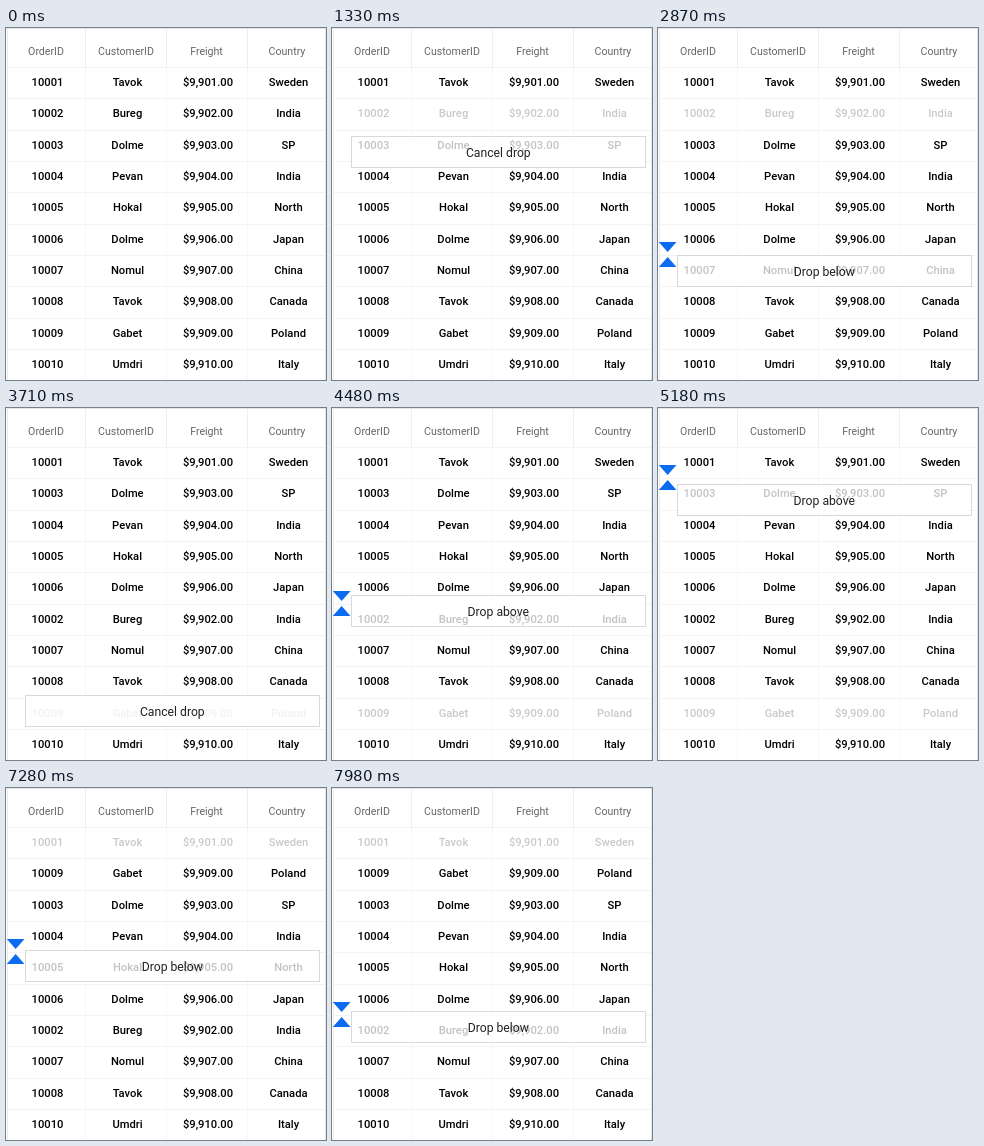
Animation, 320 px wide and 352 px high, one loop 8 s. Source, as an HTML page:

```html
<!DOCTYPE html>
<html lang="en">
<head>
<meta charset="utf-8">
<title>Row drag and drop</title>
<style>
html, body { margin: 0; width: 100%; height: 100%; overflow: hidden; background: #fff; }
svg { display: block; width: 320px; height: 352px; }
text { font-family: Roboto, "Open Sans", sans-serif; text-anchor: middle; }
.head { font-size: 10.6px; fill: #666; }
.cell { font-size: 11.2px; font-weight: 500; fill: #000; }
.tip { font-size: 12.2px; fill: #222; }
</style>
</head>
<body>
<svg id="stage" viewBox="0 0 320 352"></svg>
<script>
const LOOP = 8000, STEP = 70, TOP = 39, PITCH = 31.35;
const COLS = [41.5, 121.5, 202, 282.5];
const HEADS = ["OrderID", "CustomerID", "Freight", "Country"];
const CUSTOMERS = ["Tavok", "Bureg", "Dolme", "Pevan", "Hokal", "Dolme", "Nomul", "Tavok", "Gabet", "Umdri"];
const COUNTRIES = ["Sweden", "India", "SP", "India", "North", "Japan", "China", "Canada", "Poland", "Italy"];

// slot: row picked up; to: slot it lands in; path: [ms, top of the dragged box]
const DRAGS = [
  { slot: 1, to: 5, dim: 700, drop: 3220, grip: -7, label: "Drop below",
    path: [[700, 71], [1330, 108], [1470, 121], [2170, 185], [2310, 195], [3080, 232]] },
  { slot: 8, to: 1, dim: 3430, drop: 6090, grip: 16, label: "Drop above",
    path: [[3570, 287], [3710, 287], [4340, 209], [5180, 76], [6020, 56]] },
  { slot: 0, to: 5, dim: 6300, drop: LOOP, grip: -7, label: "Drop below",
    path: [[6510, 40], [6650, 64], [7280, 162], [7980, 223]] }
];

const stage = document.getElementById("stage");

function add(parent, tag, attrs, text) {
  const el = document.createElementNS("http://www.w3.org/2000/svg", tag);
  for (const k in attrs) el.setAttribute(k, attrs[k]);
  if (text) el.textContent = text;
  return parent.appendChild(el);
}
const line = (x, y, width, height, fill) => add(stage, "rect", { x, y, width, height, fill });
const edge = i => TOP + i * PITCH;

for (const x of [79, 160, 241]) {
  line(x, 1, 1, 38, "#eeeeee");
  line(x, 40, 1, 312, "#f7f7f7");
}
for (let i = 0; i < 10; i++) line(2, Math.round(edge(i)), 317, 1, "#f3f3f3");
line(0, 0, 320, 1, "#e6e6e6");
line(1, 0, 1, 352, "#ececec");
line(319, 0, 1, 352, "#e6e6e6");
HEADS.forEach((h, c) => add(stage, "text", { class: "head", x: COLS[c] - 1.5, y: 27 }, h));

const rows = CUSTOMERS.map((name, i) => {
  const g = add(stage, "g", {});
  const cells = [String(10001 + i), name, "$9,9" + String(i + 1).padStart(2, "0") + ".00", COUNTRIES[i]];
  cells.forEach((s, c) => add(g, "text", { class: "cell", x: COLS[c], y: 19 }, s));
  return g;
});

const box = add(stage, "g", {});
add(box, "rect", { x: 19.5, y: .5, width: 294, height: 31, fill: "#fff", "fill-opacity": .76, stroke: "#d9d9d9" });
const tip = add(box, "text", { class: "tip", x: 166.3, y: 20.5 }, "Cancel drop");
const arrows = add(stage, "path", { d: "M.8 -13H18.5L9.65 -3ZM.8 12H18.5L9.65 2Z", fill: "#0b6cf0" });

// Smooth curve through the path's points, at rest at its end.
function along(path, t) {
  const n = path.length - 1;
  if (t >= path[n][0]) return path[n][1];
  const slope = i => {
    if (i === n) return 0;
    const a = path[Math.max(i - 1, 0)], b = path[i + 1];
    return (b[1] - a[1]) / (b[0] - a[0]);
  };
  let i = 0;
  while (t >= path[i + 1][0]) i++;
  const [t0, y0] = path[i], [t1, y1] = path[i + 1];
  const d = t1 - t0, u = (t - t0) / d, v = 1 - u;
  return y0 * v * v * (1 + 2 * u) + y1 * u * u * (3 - 2 * u)
    + d * u * v * (slope(i) * v - slope(i + 1) * u);
}

function draw(ms) {
  const t = Math.floor(ms / STEP) * STEP;
  const order = rows.map((_, i) => i);
  let drag;
  for (drag of DRAGS) {
    if (t < drag.drop) break;
    order.splice(drag.to, 0, order.splice(drag.slot, 1)[0]);
  }
  order.forEach((id, slot) => {
    rows[id].setAttribute("transform", `translate(0 ${Math.round(edge(slot))})`);
    rows[id].setAttribute("opacity", t >= drag.dim && slot === drag.slot ? .21 : 1);
  });

  const held = t >= drag.path[0][0];
  let moved = false;
  if (held) {
    const y = Math.round(along(drag.path, t));
    const over = Math.floor((y + drag.grip - TOP) / PITCH);
    const down = drag.to > drag.slot;
    moved = down ? over > drag.slot : over < drag.slot;
    box.setAttribute("transform", `translate(0 ${y})`);
    tip.textContent = moved ? drag.label : "Cancel drop";
    arrows.setAttribute("transform", `translate(0 ${Math.round(edge(down ? over + 1 : over))})`);
  }
  box.setAttribute("visibility", held ? "visible" : "hidden");
  arrows.setAttribute("visibility", moved ? "visible" : "hidden");
}

const start = performance.now();
function tick() {
  draw((performance.now() - start) % LOOP);
  requestAnimationFrame(tick);
}
draw(0);
requestAnimationFrame(tick);
</script>
</body>
</html>
```
